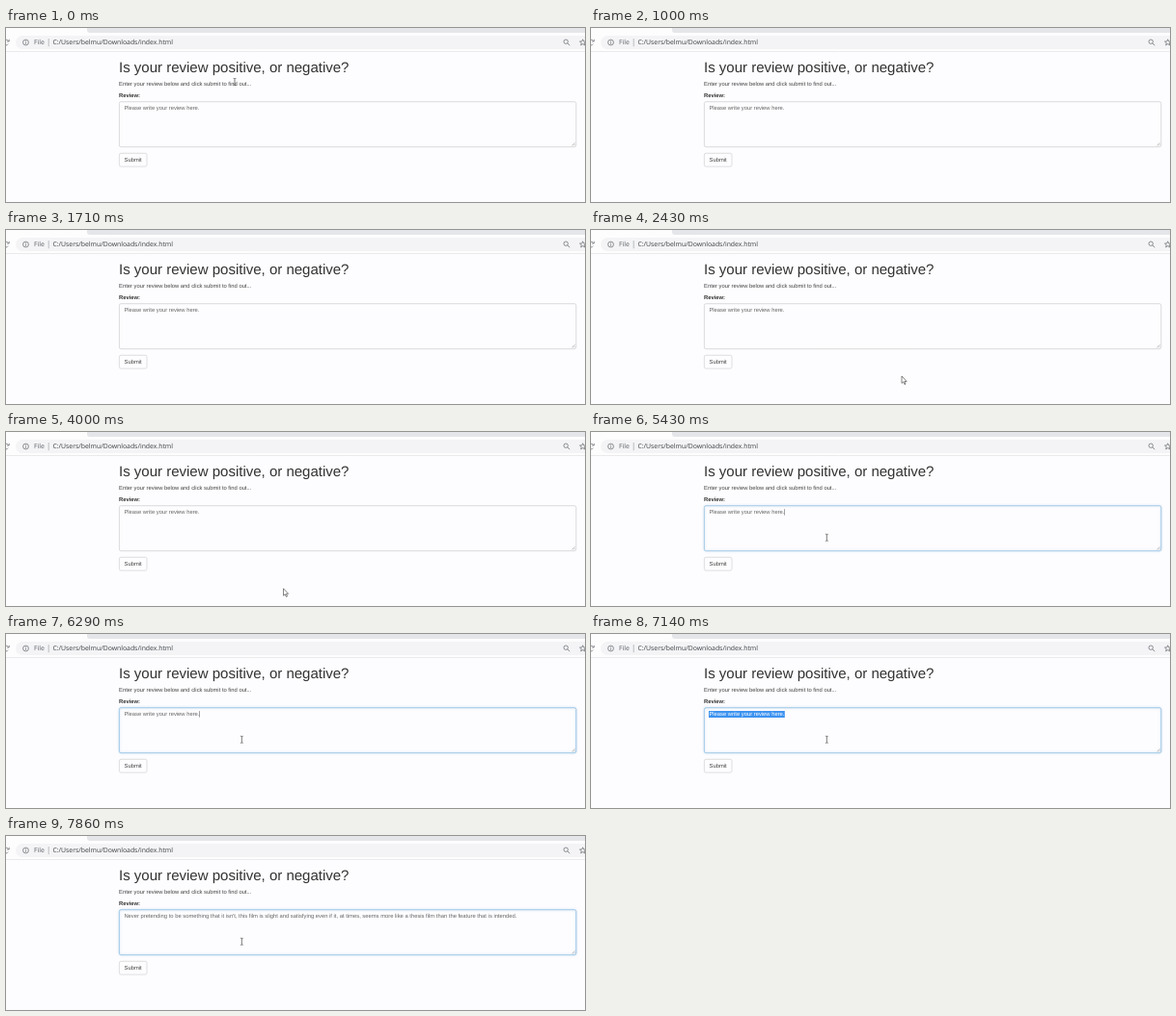
Animation of 600x181 px, one loop 8 s. Source, as an HTML page:

```html
<!DOCTYPE html>
<html lang="en">
<head>
<meta charset="utf-8">
<title>Review form</title>
<style>
  html, body { margin: 0; width: 100%; height: 100%; overflow: hidden; background: #fdfcfe; }
  svg { display: block; width: 600px; height: 181px; }
  text { font: 5.83px "Liberation Sans", Arial, sans-serif; fill: #444; text-rendering: geometricPrecision; white-space: pre; }
  .title { font-size: 15px; fill: #333; }
  .label { font-weight: 700; fill: #333; }
  .bar { font: 6.86px "Open Sans", "Noto Sans", sans-serif; fill: #3c4043; }
  .icon { fill: none; stroke: #5f6368; stroke-width: .7; }
  #field { fill: #fdfcfe; stroke: #d2d2d4; stroke-width: .8; }
  #glow { fill: none; stroke: #a3cfee; stroke-width: .9; filter: drop-shadow(0 0 .8px rgba(102, 175, 233, .4)); }
  #words { fill: #666; }
</style>
</head>
<body>
<svg viewBox="0 0 600 181">
  <rect width="600" height="181" fill="#fdfcfe"/>

  <!-- browser bar -->
  <rect width="600" height="25" fill="#fdfdfe"/>
  <path d="M84 0H600V5H87Q84 5 84 2Z" fill="#e4e6ea"/>
  <rect x="10" y="8" width="620" height="14" rx="7" fill="#f4f4f6"/>
  <path d="M0 24.5H600" stroke="#e6e6e8" stroke-width=".8"/>
  <path class="icon" d="M0 12.2A3 3 0 0 1 2.6 13.6M2.2 16.6A3 3 0 0 1 0 18M3.2 11.8V14H1"/>
  <circle class="icon" cx="20.5" cy="15" r="2.9"/>
  <path class="icon" d="M20.5 14.6V16.7M20.5 13.1V13.9"/>
  <text class="bar" x="29" y="17.4" style="fill:#5f6368">File</text>
  <path d="M44.2 11V19.2" stroke="#a5a8ac" stroke-width=".7"/>
  <text class="bar" x="48.4" y="17.4">C:/Users/belmu/Downloads/index.html</text>
  <circle class="icon" cx="580.2" cy="14.2" r="2.2"/>
  <path class="icon" d="M581.8 15.8L584.2 18.2"/>
  <path class="icon" d="M597.7 11.8L598.6 13.9L600.9 14.1L599.1 15.6L599.7 17.9L597.7 16.6L595.7 17.9L596.3 15.6L594.5 14.1L596.8 13.9Z"/>

  <!-- page -->
  <text class="title" x="117" y="46">Is your review positive, or negative?</text>
  <text x="117" y="59.8">Enter your review below and click submit to find out...</text>
  <text class="label" x="117" y="72.1">Review:</text>
  <rect id="field" x="117.4" y="76.7" width="473.4" height="47" rx="1.7"/>
  <path d="M586.6 122.4L589.6 119.4M588.4 122.4L589.6 121.2" stroke="#999" stroke-width=".6"/>
  <rect id="glow" x="117.4" y="76.7" width="473.4" height="47" rx="1.7"/>
  <rect id="mark" x="122" y="80" width="78.8" height="7" fill="#3c92f0"/>
  <text id="words" x="122.4" y="85.2"></text>
  <path id="caret" d="M0 80.2V86.6" stroke="#444" stroke-width=".5"/>
  <rect x="117.4" y="130.3" width="28.6" height="13.8" rx="1.7" fill="#fdfcfe" stroke="#d6d6d8" stroke-width=".8"/>
  <text x="122.6" y="139.2">Submit</text>

  <!-- pointers, with the hot spot at 0,0 -->
  <path id="arrow" d="M0 0V7.4L1.7 5.9L2.9 8.6L4 8.1L2.9 5.5H5.1Z" fill="#fff" stroke="#333" stroke-width=".6"/>
  <path id="beam" d="M-1.4 -3.5H-.5L0 -3.1L.5 -3.5H1.4M0 -3.1V3.1M-1.4 3.5H-.5L0 3.1L.5 3.5H1.4" fill="none" stroke="#444" stroke-width=".7"/>
</svg>

<script>
const LOOP = 8000;
const HINT = "Please write your review here.";
const REVIEW = "Never pretending to be something that it isn't, this film is slight and satisfying even if it, at times, seems more like a thesis film than the feature that is intended.";

// Each track lists [time, value...]; a value holds until the next step.
const pointer = [
  [0, "beam", 237, 56], [140, "arrow", 321, 136], [290],
  [1430, "arrow", 590, 143.5], [1570, "arrow", 533.5, 157], [1710],
  [2000, "arrow", 522, 172], [2140, "arrow", 420, 168], [2290, "arrow", 345, 159], [2430, "arrow", 322, 152],
  [3570, "arrow", 313, 154], [3710, "arrow", 300, 159], [3860, "arrow", 291, 162], [4000, "arrow", 287.5, 162.8],
  [4860, "arrow", 282, 157], [5000, "arrow", 263, 135], [5140, "beam", 246, 113], [5290, "beam", 244.3, 109.8]
];
const focus = [[0, 0], [5430, .9], [5570, 1]];
const caret = [[0, 0], [5290, 200.5], [5860, 0], [6290, 200.5], [6430, 0], [7430, 529.2], [7860, 0]];
const marked = [[0, false], [6430, true], [7430, false]];
const content = [[0, HINT], [7430, REVIEW]];

const $ = id => document.getElementById(id);
const at = (track, t) => track.findLast(step => step[0] <= t).slice(1);
const show = (el, on) => el.setAttribute("visibility", on ? "visible" : "hidden");
const move = (el, x, y) => el.setAttribute("transform", `translate(${x} ${y})`);

function draw(t) {
  const [kind, x, y] = at(pointer, t);
  for (const id of ["arrow", "beam"]) {
    show($(id), id === kind);
    if (id === kind) move($(id), x, y);
  }

  $("glow").style.opacity = at(focus, t)[0];

  const [caretX] = at(caret, t);
  show($("caret"), caretX > 0);
  move($("caret"), caretX, 0);

  const [selected] = at(marked, t);
  show($("mark"), selected);
  $("words").style.fill = selected ? "#fff" : "#666";

  const [words] = at(content, t);
  if ($("words").textContent !== words) $("words").textContent = words;
}

const start = performance.now();
function tick() {
  draw((performance.now() - start) % LOOP);
  requestAnimationFrame(tick);
}
tick();
</script>
</body>
</html>
```
